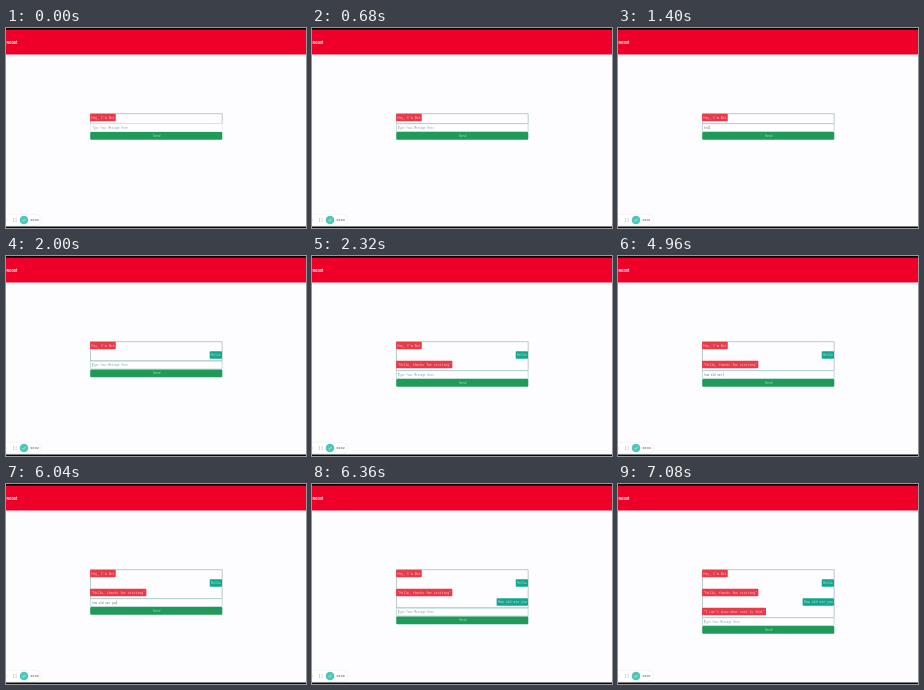
Animation, 300 px wide and 200 px high, one loop 7320 ms. Source, as an HTML page with a canvas:

```html
<!DOCTYPE html>
<html lang="en">
<head>
<meta charset="utf-8">
<title>Chat</title>
<style>
html, body { margin: 0; width: 100%; height: 100%; overflow: hidden; background: #fdfcfe; }
canvas { display: block; width: 300px; height: 200px; }
</style>
</head>
<body>
<canvas id="stage" width="300" height="200"></canvas>
<script>
const ctx = document.getElementById('stage').getContext('2d');
const LOOP = 7320;
const LEFT = 84, RIGHT = 216.5, TOP = 86, ROW = 9.5;
const MONO = '"Noto Sans Mono", "DejaVu Sans Mono", monospace';
const SANS = 'Inter, Arial, sans-serif';
const CHAT_FONT = `3.2px ${MONO}`;
const INPUT_FONT = `2.7px ${MONO}`;

const messages = [
  { at: 0, text: "Hey, I'm Bot" },
  { at: 2000, text: 'Hello', mine: true },
  { at: 2160, text: '"Hello, thanks for visiting"' },
  { at: 6280, text: 'How old are you', mine: true },
  { at: 6400, text: '"I can\'t know what sort is that"' }
];

// Each draft lists the time of every key press, then the time it is sent.
const drafts = [
  { text: 'hello', keys: [840, 1080, 1400, 1560, 1760], sent: 2000 },
  { text: 'how old are you', sent: 6280,
    keys: [2760, 3040, 3200, 3240, 3400, 3920, 4080, 4160, 4320, 4440, 4720, 4960, 5120, 5640, 5880] }
];

function rect(x, y, w, h, color) {
  ctx.fillStyle = color;
  ctx.fillRect(x, y, w, h);
}

function rounded(x, y, w, h, r, fill, stroke) {
  ctx.beginPath();
  ctx.roundRect(x, y, w, h, r);
  if (fill) { ctx.fillStyle = fill; ctx.fill(); }
  if (stroke) { ctx.strokeStyle = stroke; ctx.stroke(); }
}

function label(text, x, y, font, color, align = 'left') {
  ctx.font = font;
  ctx.fillStyle = color;
  ctx.textAlign = align;
  ctx.textBaseline = 'alphabetic';
  ctx.fillText(text, x, y);
}

function bubble(msg, y) {
  ctx.font = CHAT_FONT;
  const w = ctx.measureText(msg.text).width + 2.7;
  const x = msg.mine ? RIGHT - 0.5 - w : LEFT + 0.1;
  rounded(x, y, w, 7.4, 0.8, msg.mine ? '#12a78c' : '#e73a4b');
  label(msg.text, x + 1.4, y + 4.9, CHAT_FONT, 'rgba(255,255,255,.7)');
}

function typed(t) {
  const draft = drafts.find(d => t >= d.keys[0] && t < d.sent);
  return draft ? draft.text.slice(0, draft.keys.filter(k => k <= t).length) : '';
}

function form(t, y) {
  const focused = t >= 440;
  const text = typed(t);
  ctx.lineWidth = 0.7;
  rounded(LEFT + 0.4, y + 0.5, RIGHT - LEFT - 0.8, 7.8, 0.5, '#fff', focused ? '#a3d2cd' : '#e6e9ea');
  label(text || 'Type Your Message Here', 86.3, y + 5.4, INPUT_FONT, text ? '#6c7175' : '#85a3ae');
  if (focused) {
    ctx.font = INPUT_FONT;
    rect(86.2 + ctx.measureText(text).width, y + 2.4, 0.4, 3.8, '#6d8290');
  }
  rounded(LEFT + 0.2, y + 8.8, RIGHT - LEFT - 0.4, 7.7, 1, '#209a59');
  label('Send', 150.5, y + 13.7, CHAT_FONT, 'rgba(255,255,255,.65)', 'center');
}

function chat(t) {
  const shown = messages.filter(m => m.at <= t);
  const h = shown.length * ROW;
  ctx.lineWidth = 0.6;
  ctx.strokeStyle = '#95a8a8';
  ctx.strokeRect(LEFT + 0.4, TOP - 0.2, RIGHT - LEFT - 0.8, h);
  shown.forEach((m, i) => bubble(m, TOP - 0.2 + i * ROW));
  form(t, TOP + h - 0.3);
}

function recorder(t) {
  ctx.save();
  ctx.shadowColor = 'rgba(0,0,0,.12)';
  ctx.shadowBlur = 2;
  rounded(-6, 187, 41, 10, 5, '#fff');
  ctx.restore();
  rect(0, 190.7, 0.5, 2.8, '#ccc');
  for (const x of [7, 9.6]) {
    rect(x, 190.5, 1, 1, '#aaa');
    rect(x, 192.7, 1, 1, '#aaa');
  }
  ctx.beginPath();
  ctx.arc(18, 192, 4.3, 0, Math.PI * 2);
  ctx.fillStyle = '#4cc8b6';
  ctx.fill();
  ctx.beginPath();
  ctx.moveTo(16.4, 192.3);
  ctx.lineTo(17.4, 193.2);
  ctx.lineTo(19.6, 190.9);
  ctx.strokeStyle = 'rgba(255,255,255,.8)';
  ctx.lineWidth = 0.7;
  ctx.stroke();
  label('00:0' + Math.floor(t / 1000), 24.6, 193.1, `bold 2.7px ${SANS}`, '#666');
}

function draw(t) {
  rect(0, 0, 300, 200, '#fdfcfe');
  rect(0, 0, 300, 2, '#080406');
  rect(0, 1.7, 300, 24.8, '#ef0029');
  label('Robot', 0.6, 16.3, `bold 3.8px ${SANS}`, '#fff');
  chat(t);
  recorder(t);
  rect(0, 198.5, 300, 1.5, '#080808');
}

const start = performance.now();
function tick() {
  draw((performance.now() - start) % LOOP);
  requestAnimationFrame(tick);
}
tick();
</script>
</body>
</html>
```
